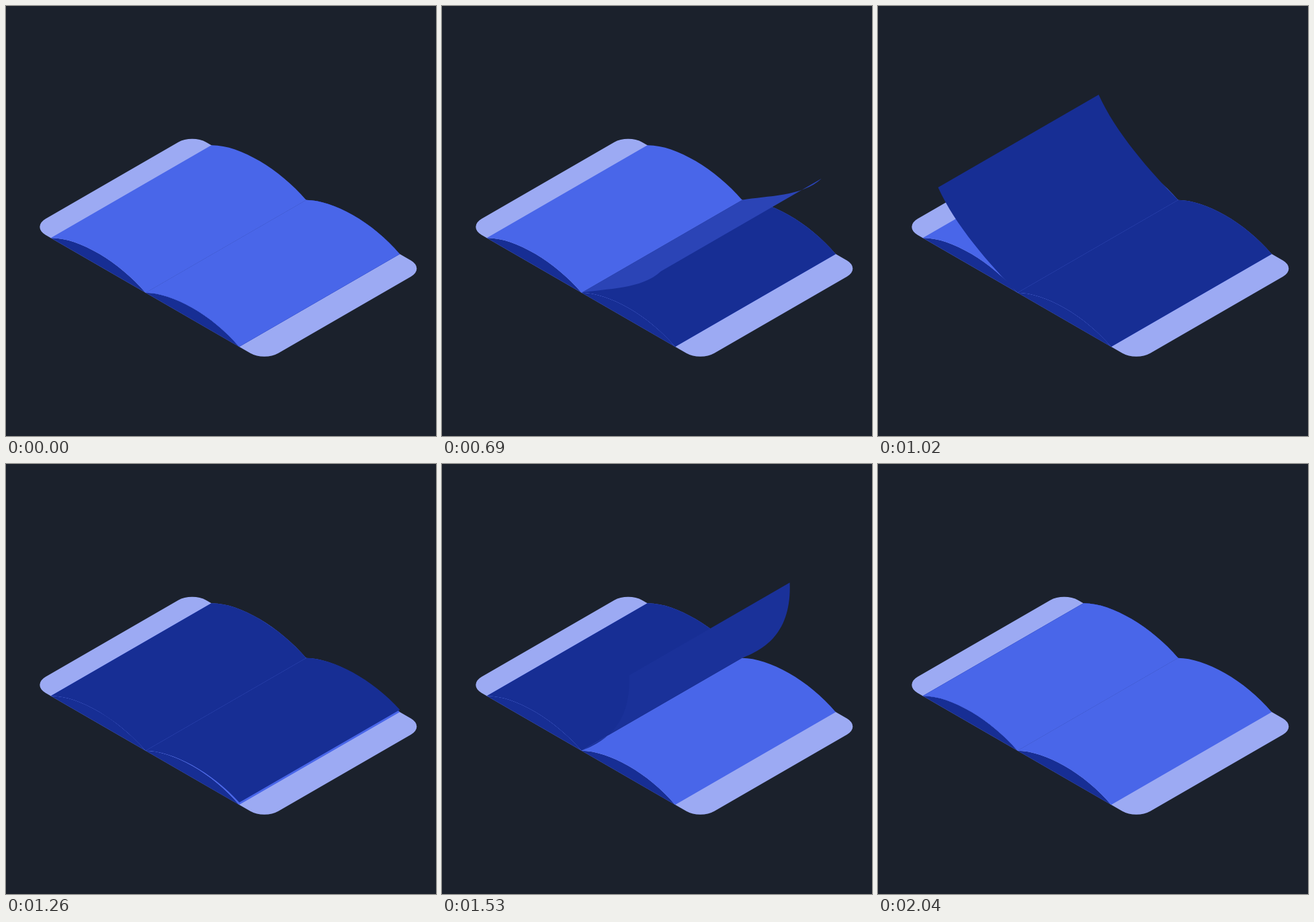
An HTML page with a canvas that plays this animation: 640x640 px, repeating every 2460 ms.

```html
<!DOCTYPE html>
<html lang="en">
<head>
<meta charset="utf-8">
<title>Page flip</title>
<style>
  html, body { margin: 0; height: 100%; overflow: hidden; background: #1b212c; }
  canvas { display: block; }
</style>
</head>
<body>
<canvas id="stage" width="640" height="640"></canvas>
<script>
const ctx = document.getElementById('stage').getContext('2d');
const LOOP = 2460, STEP = 30;
const COVER = '#9caaf3', LIGHT = [73, 102, 233], DARK = [23, 46, 148];
const SPINE = [207.7, 426.8], DEPTH = [239, -138];
const WIDTH = [139.3, 80.4], RISE = 160;

// A page edge is a cubic curve whose points swing around the spine.
// Angles in degrees at the key times of a turn, in ms.
const KEYS = [0, 304, 360, 514, 785];
const NEAR = [26.5, 40, 65.5, 159.5, 153];
const FAR = [12, 43.5, 70, 154, 167.7];
const TIP = [0, 62, 81.2, 141.5, 180];
const REACH = [1, 1.084, 1.094, 1.013, 1.013];

const clamp01 = x => Math.min(1, Math.max(0, x));

// Monotone cubic interpolation over KEYS, at rest at both ends.
function track(values, time) {
  const t = Math.min(KEYS[4], Math.max(0, time));
  const slope = i => (values[i + 1] - values[i]) / (KEYS[i + 1] - KEYS[i]);
  const tangent = i => {
    if (i === 0 || i === 4) return 0;
    const a = slope(i - 1), b = slope(i);
    return a * b > 0 ? 2 * a * b / (a + b) : 0;
  };
  let i = 0;
  while (i < 3 && t > KEYS[i + 1]) i++;
  const span = KEYS[i + 1] - KEYS[i], x = (t - KEYS[i]) / span;
  return values[i] + (values[i + 1] - values[i]) * x * x * (3 - 2 * x)
    + span * x * (1 - x) * (tangent(i) * (1 - x) - tangent(i + 1) * x);
}

function swing(angle, radius) {
  const a = angle * Math.PI / 180, c = radius * Math.cos(a), s = radius * Math.sin(a);
  return [SPINE[0] + WIDTH[0] * c, SPINE[1] + WIDTH[1] * c - RISE * s];
}

const edge = time => [
  SPINE,
  swing(track(NEAR, time), 0.32),
  swing(track(FAR, time), 0.73),
  swing(track(TIP, time), track(REACH, time))
];

const mix = (from, to, k) =>
  `rgb(${from.map((v, i) => Math.round(v + (to[i] - v) * k)).join()})`;

function page(time, color) {
  const front = edge(time);
  const back = front.map(([x, y]) => [x + DEPTH[0], y + DEPTH[1]]);
  ctx.beginPath();
  ctx.moveTo(...front[0]);
  ctx.bezierCurveTo(...front[1], ...front[2], ...front[3]);
  ctx.lineTo(...back[3]);
  ctx.bezierCurveTo(...back[2], ...back[1], ...back[0]);
  ctx.closePath();
  ctx.fillStyle = color;
  ctx.fill();
}

// Dark gap below a resting page
function side(time) {
  const e = edge(time);
  ctx.beginPath();
  ctx.moveTo(...e[0]);
  ctx.bezierCurveTo(...e[1], ...e[2], ...e[3]);
  ctx.closePath();
  ctx.fillStyle = `rgb(${DARK})`;
  ctx.fill();
}

function cover() {
  ctx.save();
  ctx.transform(0.866, 0.5, 0.866, -0.5, 38.1, 328.8);
  ctx.beginPath();
  ctx.roundRect(0, 0, 400, 276, 24);
  ctx.fillStyle = COVER;
  ctx.fill();
  ctx.restore();
}

function draw(t) {
  const first = t - 480, second = t - 1226, end = KEYS[4];
  ctx.fillStyle = '#1b212c';
  ctx.fillRect(0, 0, 640, 640);
  cover();
  for (const rest of [end, 0]) {
    side(rest);
    page(rest, `rgb(${LIGHT})`);
  }
  const turnFirst = () => page(first, mix(LIGHT, DARK, clamp01((first - 12) / 330)));
  const turnSecond = () => page(second, mix(DARK, LIGHT, clamp01((second - 273) / 512)));
  const order = second > 0 ? [turnFirst, turnSecond] : [turnSecond, turnFirst];
  order.forEach(turn => turn());
}

const start = performance.now();
function frame() {
  const t = (performance.now() - start) % LOOP;
  draw(Math.floor(t / STEP) * STEP);
  requestAnimationFrame(frame);
}
frame();
</script>
</body>
</html>
```
